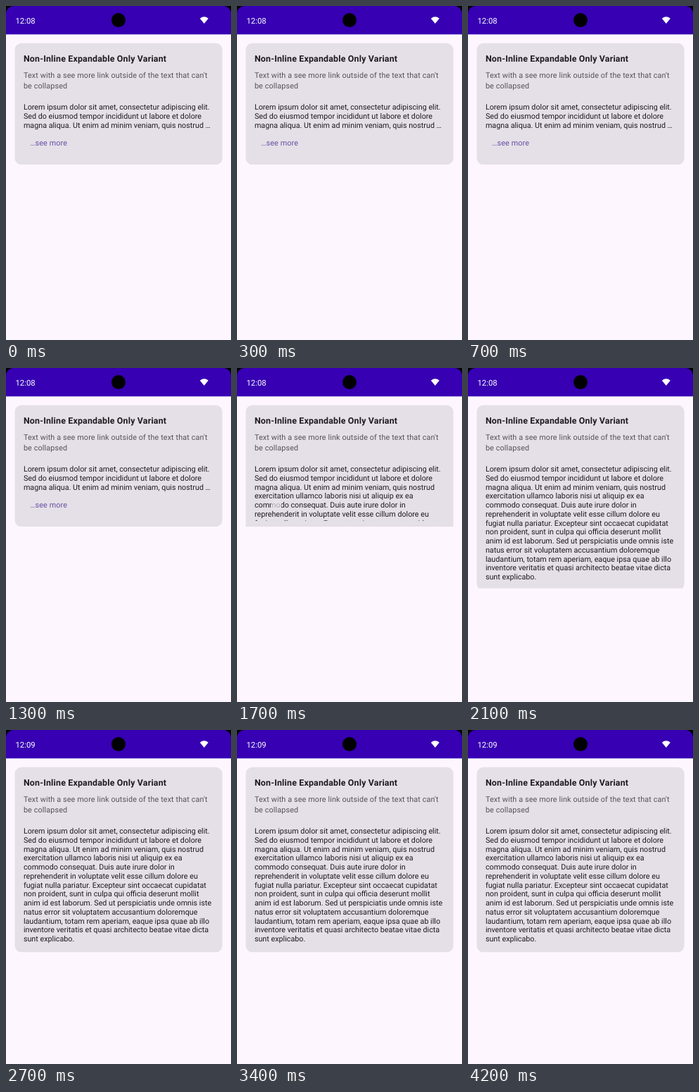
Animation of 320 by 474 pixels, one loop 4300 ms. Source, as an HTML page:

```html
<!DOCTYPE html>
<html lang="en">
<head>
<meta charset="utf-8">
<title>Expandable text card</title>
<style>
  html, body { margin: 0; width: 100%; height: 100%; overflow: hidden; background: #fef6fe; }
  svg { display: block; width: 320px; height: 474px; }
  text { font: 10.75px Roboto, sans-serif; fill: #1d1b20; text-rendering: geometricPrecision; }
  .clock { font-size: 11.3px; fill: #fff; }
  .title { font-size: 12.4px; font-weight: 700; letter-spacing: .185px; }
  .sub { font-size: 10.8px; fill: #55515b; letter-spacing: .125px; }
  .link { font-size: 10.8px; fill: #6650a4; letter-spacing: .12px; }
</style>
</head>
<body>
<svg viewBox="0 0 320 474">
  <defs>
    <clipPath id="cardClip"><rect id="cardBox" y="40" width="320"/></clipPath>
    <clipPath id="bodyClip"><rect id="bodyBox" y="130" width="320"/></clipPath>
  </defs>
  <rect width="320" height="474" fill="#fef6fe"/>
  <rect width="320" height="40.3" fill="#3700b3"/>
  <path d="M0 0H9.5Q1.5 1.5 0 9.5ZM320 0H310.5Q318.5 1.5 320 9.5Z"/>
  <circle cx="160" cy="20.1" r="10"/>
  <path d="M281.8 25L275.8 17.7Q281.8 13 287.8 17.7Z" fill="#fff"/>
  <text id="clock" class="clock" x="13.5" y="24.8"></text>
  <g clip-path="url(#cardClip)">
    <rect id="card" x="12.5" y="52.8" width="295.1" rx="9.3" fill="#e5dfe7"/>
    <text class="title" x="24.9" y="79">Non-Inline Expandable Only Variant</text>
    <g id="sub"></g>
    <g id="body" clip-path="url(#bodyClip)"></g>
    <text id="link" class="link" x="34.2" y="198">…see more</text>
  </g>
  <circle id="tap" cx="56" cy="194.5" r="7.5" fill="#e9e4eb"/>
</svg>
<script>
const LOOP = 4300, STEP = 100;
const OPEN_AT = 1700, CLOCK_AT = 2700;
const SHUT = 225.3, FULL = 315.4;
const GROWTH = [[1700, 0], [1800, .23], [1900, .575], [2000, .83], [2100, .97], [2200, 1]];
const REVEAL = [[1700, 217], [1800, 255], [1900, 290], [2000, FULL]];
const TAP = [[1400, 0], [1500, .4], [1600, .6], [1700, .7], [1800, 0]];

const lines = [
  "Lorem ipsum dolor sit amet, consectetur adipiscing elit.",
  "Sed do eiusmod tempor incididunt ut labore et dolore",
  "magna aliqua. Ut enim ad minim veniam, quis nostrud",
  "exercitation ullamco laboris nisi ut aliquip ex ea",
  "commodo consequat. Duis aute irure dolor in",
  "reprehenderit in voluptate velit esse cillum dolore eu",
  "fugiat nulla pariatur. Excepteur sint occaecat cupidatat",
  "non proident, sunt in culpa qui officia deserunt mollit",
  "anim id est laborum. Sed ut perspiciatis unde omnis iste",
  "natus error sit voluptatem accusantium doloremque",
  "laudantium, totam rem aperiam, eaque ipsa quae ab illo",
  "inventore veritatis et quasi architecto beatae vitae dicta",
  "sunt explicabo."
];

const $ = id => document.getElementById(id);

function addLines(parent, rows, y, pitch, cls = "") {
  return rows.map((row, i) => {
    const el = document.createElementNS("http://www.w3.org/2000/svg", "text");
    el.setAttribute("class", cls);
    el.setAttribute("x", 24.9);
    el.setAttribute("y", y + i * pitch);
    el.textContent = row;
    return parent.appendChild(el);
  });
}

// Linear lookup in a table of [time, value] pairs
function at(table, t) {
  if (t <= table[0][0]) return table[0][1];
  for (let i = 1; i < table.length; i++) {
    const [t0, v0] = table[i - 1], [t1, v1] = table[i];
    if (t <= t1) return v0 + (v1 - v0) * (t - t0) / (t1 - t0);
  }
  return table[table.length - 1][1];
}

addLines($("sub"), ["Text with a see more link outside of the text that can't", "be collapsed"], 101.8, 15.56, "sub");
const body = addLines($("body"), lines, 147.1, 12.74);

function draw(t) {
  const open = t >= OPEN_AT;
  const bottom = SHUT + (FULL - SHUT) * at(GROWTH, t);
  $("card").setAttribute("height", (open ? FULL : SHUT) - 52.8);
  $("cardBox").setAttribute("height", bottom - 40);
  $("bodyBox").setAttribute("height", at(REVEAL, t) - 130);
  body.forEach((el, i) => el.style.display = open || i < 3 ? "" : "none");
  body[2].textContent = lines[2] + (open ? "" : " …");
  $("link").style.display = open ? "none" : "";
  $("tap").style.opacity = at(TAP, t);
  $("clock").textContent = t < CLOCK_AT ? "12:08" : "12:09";
}

const start = performance.now();
let shown = -1;
function tick() {
  const t = Math.floor((performance.now() - start) % LOOP / STEP) * STEP;
  if (t !== shown) draw(shown = t);
  requestAnimationFrame(tick);
}
tick();
</script>
</body>
</html>
```
